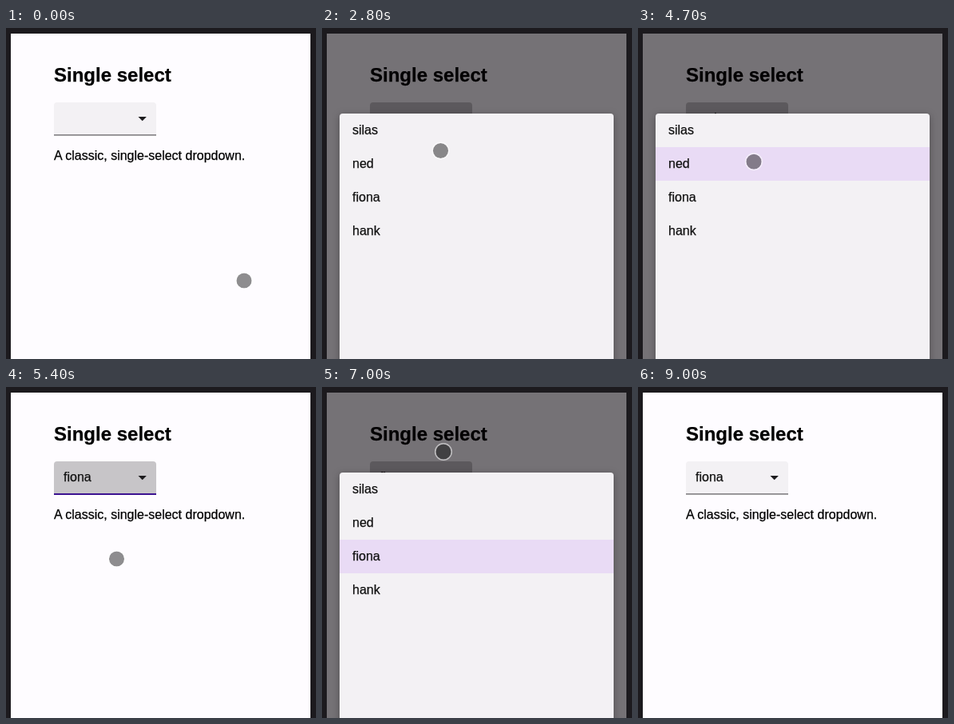
Recreate the animation shown at these times as an HTML page. Size 388x414 px, loop 9.7 s.

```html
<!DOCTYPE html>
<html lang="en">
<head>
<meta charset="utf-8">
<title>Single select</title>
<style>
  html, body { margin: 0; width: 100%; height: 100%; overflow: hidden; background: #1c1a1e; }
  svg { display: block; }
  text { font: 16px "Liberation Sans", Arial, sans-serif; fill: #111; stroke: #111; stroke-width: .25px; }
  .title { font-weight: bold; font-size: 24px; }
  .title, .note { fill: #000; stroke: #000; }
  #sheet { filter: drop-shadow(0 2px 5px rgba(0, 0, 0, .3)); }
</style>
</head>
<body>
<svg width="388" height="414" viewBox="0 0 388 414">
  <rect x="6" y="7" width="375" height="407" fill="#fefcff"/>
  <text class="title" x="60" y="67">Single select</text>
  <path id="field" d="M60 135V97a4 4 0 0 1 4-4H184a4 4 0 0 1 4 4V135Z"/>
  <rect id="line" x="60" y="133" width="128"/>
  <text id="value" x="72" y="118"></text>
  <path d="M165.5 111h10.4l-5.2 5.2z" fill="#1d1c1e"/>
  <text class="note" x="60" y="165">A classic, single-select dropdown.</text>
  <rect id="dim" x="6" y="7" width="375" height="407" fill="#040004"/>
  <g id="sheet">
    <rect x="22" y="107" width="343" height="420" rx="4" fill="#f3f1f4"/>
    <rect id="chosen" x="22" width="343" height="42" fill="#e9dbf5"/>
    <g id="items"></g>
  </g>
  <g id="cursor">
    <g id="ring" fill="none">
      <circle r="22.8" stroke="#fff" stroke-width="1.2" stroke-opacity=".8"/>
      <circle r="21.4" stroke="#0b0b0b" stroke-width="1.5"/>
    </g>
    <circle r="9.6" fill-opacity=".44"/>
    <circle r="10.3" fill="none" stroke="#fff" stroke-width="1.5" stroke-opacity=".55"/>
  </g>
</svg>
<script>
const LOOP = 9700, STEP = 100, ROW = 42, TAP = 200;
const names = ["silas", "ned", "fiona", "hank"];
const el = id => document.getElementById(id);

// Each round: tap the field, the sheet opens, tap again, it closes with a pick.
const rounds = [
  { tap: 2200, press: 3100, close: 3200, pick: 1 },
  { tap: 4100, press: 5200, close: 5400, pick: 2 },
  { tap: 6000, press: 8000, close: 8200, pick: 2 }
];

// Pointer moves: from, to, x, y.
const home = [298, 316];
const moves = [
  [1100, 2100, 151, 101],
  [2400, 2800, 148.5, 153.5],
  [3400, 3800, 151.5, 119.5],
  [4400, 5000, 138.5, 215],
  [5400, 5900, 154, 120],
  [6500, 6700, 141, 101],
  [6700, 7000, 152, 81],
  [8600, 9000, 272, -15]
];

const ease = u => u * u * (3 - 2 * u);
const progress = (t, a, b) => ease(Math.min(1, Math.max(0, (t - a) / (b - a))));
const within = (t, a, b) => t >= a && t < b;

const pointAt = t => moves.reduce(([x, y], [a, b, toX, toY]) => {
  const k = progress(t, a, b);
  return [x + (toX - x) * k, y + (toY - y) * k];
}, home);

names.forEach((name, i) => {
  const text = document.createElementNS("http://www.w3.org/2000/svg", "text");
  text.setAttribute("x", 38);
  text.setAttribute("y", 133 + i * ROW);
  text.textContent = name;
  el("items").append(text);
});

const set = (id, attrs) => {
  for (const key in attrs) el(id).setAttribute(key, attrs[key]);
};
const show = (id, on) => set(id, { visibility: on ? "visible" : "hidden" });

function draw(time) {
  const t = Math.floor(time % LOOP / STEP) * STEP;
  const open = rounds.find(r => within(t, r.tap + TAP, r.close));
  const rising = open && t < open.tap + TAP + STEP;
  const focused = rounds.some(r => within(t, r.tap + TAP, r.close + STEP));
  const tapping = rounds.some(r => within(t, r.tap, r.tap + TAP) || within(t, r.press, r.close));
  const pick = rounds.reduce((last, r) => t >= r.close ? r.pick : last, -1);

  set("field", { fill: focused ? "#c7c5c8" : "#f3f1f4" });
  set("line", { height: focused ? 2 : 1.7, fill: focused ? "#3c1291" : "#89878b" });
  el("value").textContent = names[pick] || "";

  set("dim", { "fill-opacity": !open ? 0 : rising ? .3 : .545 });
  show("sheet", open);
  set("sheet", { transform: `translate(0 ${rising ? 90 : 0})` });
  set("chosen", { y: 107 + pick * ROW, opacity: pick < 0 ? 0 : 1 });

  set("cursor", { transform: `translate(${pointAt(t)})` });
  show("ring", tapping);
}

const start = performance.now();
function tick() {
  draw(performance.now() - start);
  requestAnimationFrame(tick);
}
tick();
</script>
</body>
</html>
```
